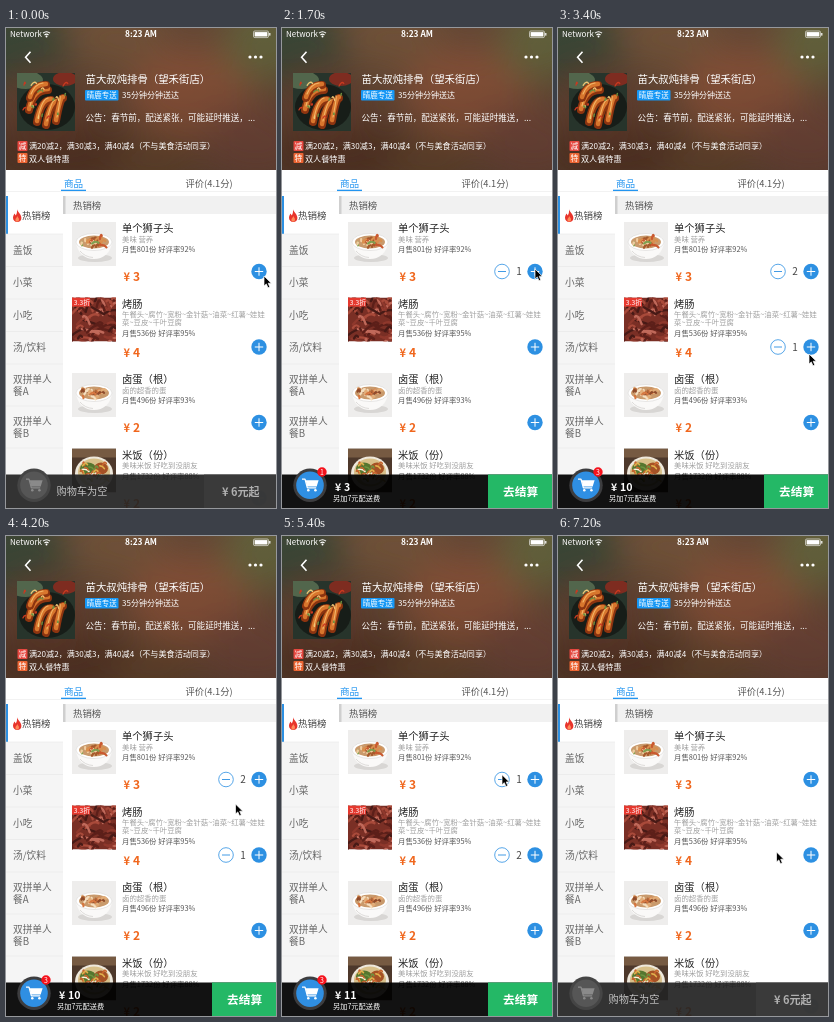
Recreate the animation shown at these times as an HTML page. Size 270 px wide and 480 px high, loop 7300 ms.

```html
<!DOCTYPE html>
<html lang="zh-CN">
<head>
<meta charset="utf-8">
<title>Menu and cart</title>
<style>
html, body { margin: 0; width: 100%; height: 100%; overflow: hidden; background: #fff; }
svg { display: block; width: 100vw; height: 100vh; }
text { font-family: "Noto Sans CJK SC", "Noto Sans CJK", "Noto Sans", sans-serif; white-space: pre; }
</style>
</head>
<body>
<svg id="stage" viewBox="0 0 270 480" xmlns="http://www.w3.org/2000/svg">
  <defs>
    <filter id="soft" x="-50%" y="-50%" width="200%" height="200%"><feGaussianBlur stdDeviation="17"/></filter>
    <linearGradient id="shade" x1="0" y1="0" x2="0" y2="1">
      <stop offset="0" stop-color="#000" stop-opacity=".05"/>
      <stop offset="1" stop-color="#000" stop-opacity=".2"/>
    </linearGradient>
    <clipPath id="top"><rect width="270" height="142"/></clipPath>
    <clipPath id="thumb"><rect width="44" height="44"/></clipPath>
    <clipPath id="cover"><rect x="11" y="45" width="58" height="58"/></clipPath>
  </defs>
  <g id="page"></g>
  <g id="controls"></g>
  <g id="bar"></g>
  <g id="balls"></g>
  <path id="cursor" d="M0 0V10L2.3 7.9L4 11.8L5.8 11L4.2 7.2H7.3Z" fill="#000" stroke="#fff" stroke-width=".7"/>
</svg>
<script>
const $ = id => document.getElementById(id);
const BLUE = '#2d90e2', ORANGE = '#f0661c';
const LOOP = 7300, TICK = 100, FLY = 500, SLIDE = 220;
const ROW = 75.5;

const text = (x, y, size, fill, s, extra = '') =>
  `<text x="${x}" y="${y}" font-size="${size}" fill="${fill}" ${extra}>${s}</text>`;
const rect = (x, y, w, h, fill, extra = '') =>
  `<rect x="${x}" y="${y}" width="${w}" height="${h}" fill="${fill}" ${extra}/>`;
const circle = (x, y, r, fill, extra = '') =>
  `<circle cx="${x}" cy="${y}" r="${r}" fill="${fill}" ${extra}/>`;
const oval = (x, y, rx, ry, fill, extra = '') =>
  `<ellipse cx="${x}" cy="${y}" rx="${rx}" ry="${ry}" fill="${fill}" ${extra}/>`;
const line = (d, color, w, extra = '') =>
  `<path d="${d}" fill="none" stroke="${color}" stroke-width="${w}" ${extra}/>`;
const BOLD = 'font-weight="700"', MEDIUM = 'font-weight="500"', MID = 'text-anchor="middle"';

function random(seed) {
  return () => (seed = (seed * 16807) % 2147483647) / 2147483647;
}

function strokes(seed, n, x, y, w, h, colors, len, width) {
  const rnd = random(seed);
  let s = '';
  for (let i = 0; i < n; i++) {
    const px = x + rnd() * w, py = y + rnd() * h;
    const dx = (rnd() - .3) * len, dy = (rnd() - .5) * len;
    const color = colors[Math.floor(rnd() * colors.length)];
    s += line(`M${px} ${py}q${dx} ${dy - 3} ${dx * 1.7} ${dy}`, color, width, 'stroke-linecap="round"');
  }
  return s;
}

function header() {
  const glow = [
    [10, 20, 60, 45, '#3e4a38'], [110, 10, 50, 35, '#74543a'], [185, 65, 65, 45, '#8d553b'],
    [262, 15, 45, 40, '#66653c'], [60, 125, 80, 30, '#5b3728'], [250, 115, 55, 40, '#75483a'],
    [150, 135, 45, 22, '#6c4a2e'], [40, 75, 45, 35, '#6a4330']
  ].map(g => oval(...g)).join('');
  const wings = [[23, 82, 42, 62], [31, 94, 45, 72], [40, 97, 52, 74], [50, 93, 57, 70], [24, 70, 40, 57]]
    .map(([a, b, c, d]) =>
      line(`M${a} ${b}Q${a + 4} ${d} ${c} ${d}`, '#8c3410', 8, 'stroke-linecap="round"') +
      line(`M${a} ${b - 1}Q${a + 4} ${d - 1} ${c} ${d - 1}`, '#d8762d', 4.5, 'stroke-linecap="round"') +
      line(`M${a + 1} ${b - 4}Q${a + 5} ${d - 1} ${c - 3} ${d - 2}`, '#f2b567', 1.2, 'stroke-linecap="round"')
    ).join('');
  return `<g clip-path="url(#top)">${rect(0, 0, 270, 142, '#674a37')}<g filter="url(#soft)">${glow}</g>
      ${rect(0, 0, 270, 142, 'url(#shade)')}</g>
    <g clip-path="url(#cover)">${rect(11, 45, 58, 58, '#27342b')}
      ${oval(20, 52, 17, 9, '#52664c')}${oval(59, 51, 12, 7, '#7e2c20')}
      ${oval(41, 79, 28, 23, '#171d18')}${wings}
      ${strokes(31, 16, 18, 54, 44, 40, ['#6b9140', '#c93a20', '#efc777'], 6, 1.3)}</g>`
    + text(4, 9.2, 8, '#fff', 'Network')
    + line('M37 5.2Q40.5 2.2 44 5.2M38.5 7Q40.5 5.3 42.5 7', '#fff', 1.1) + circle(40.5, 8.6, 1, '#fff')
    + text(135, 9.4, 8.4, '#fff', '8:23 AM', MID + ' ' + BOLD)
    + rect(247.5, 3, 15, 6.6, 'none', 'rx="1.3" stroke="#fff" stroke-width=".6"')
    + rect(248.6, 4.1, 12.8, 4.4, '#fff') + rect(263.2, 5, 1.2, 2.6, '#fff')
    + line('M24.5 23.7L19.6 29.2L24.5 34.7', '#fff', 1.6)
    + [244, 249.5, 255].map(x => circle(x, 29, 1.6, '#fff')).join('')
    + text(79.5, 55.2, 10.4, '#fff', '苗大叔炖排骨（望禾街店）')
    + rect(79, 62, 33.5, 10.5, '#1597f5', 'rx="1"')
    + text(80.8, 70, 7.5, '#fff', '晴鹿专送')
    + text(116, 70.3, 8, '#fff', '35分钟分钟送达')
    + text(79.5, 92.7, 8.55, '#fff', '公告：春节前，配送紧张，可能延时推送，...')
    + rect(11.5, 113, 10, 10, '#e5473f', 'rx="1"') + text(12.6, 121, 7.8, '#fff', '减')
    + text(23, 121.2, 8.1, '#fff', '满20减2，满30减3，满40减4（不与美食活动同享）')
    + rect(11.5, 125, 10, 10, '#ec6533', 'rx="1"') + text(12.6, 133, 7.8, '#fff', '特')
    + text(23, 134, 8.1, '#fff', '双人餐特惠');
}

function sidebar() {
  const rows = [[238.5, '盖饭'], [271, '小菜'], [303.5, '小吃'], [336, '汤/饮料'], [378, '双拼单人', '餐A'], [420, '双拼单人', '餐B']];
  let top = 206, s = rect(0, 168, 57, 280, '#f5f5f5') + rect(0, 168, 57, 38, '#fff') + rect(0, 168, 2, 38, BLUE);
  s += '<path d="M11 181.2C11.6 184 15.4 186 15.4 190C15.4 192.6 13.6 194 11.3 194C8.8 194 7 192.4 7 189.8C7 188 8 186.6 8.7 185.6L9.6 187.4C11 185.8 11.2 183.6 11 181.2Z" fill="#e8352c"/>';
  s += '<path d="M11.4 188C11.8 189.6 13 190 13 191.6C13 193 12.2 193.6 11.2 193.6S9.4 193 9.4 191.7C9.4 190.3 11 189.7 11.4 188Z" fill="#ff8a5a"/>';
  s += text(16, 191.2, 9.5, '#444', '热销榜');
  for (const [bottom, a, b] of rows) {
    const mid = (top + bottom) / 2;
    s += text(7, mid + (b ? -1.9 : 3.5), 9.7, '#666', a);
    if (b) s += text(7, mid + 10, 9.7, '#666', b);
    s += rect(0, top - .25, 57, .5, '#e2e2e2');
    top = bottom;
  }
  return s + rect(0, top - .25, 57, .5, '#e2e2e2');
}

function bowl(seed, colors) {
  return rect(0, 0, 44, 44, '#eeedec') + oval(23, 36, 17, 4, '#d8d6d4')
    + '<path d="M4 20C5 31 13 37 22 37S39 31 40 20Z" fill="#faf9f8"/>'
    + oval(22, 20, 18, 8.5, '#fff', 'stroke="#d9d7d5" stroke-width=".6"') + oval(22, 20, 15, 6.5, '#c99a6c')
    + strokes(seed, 26, 10, 16, 20, 8, colors, 6, 2.2)
    + line('M8 29Q13 35 21 35.5', '#dedcda', 1);
}

const pictures = [
  bowl(7, ['#a65a2c', '#d98f4e', '#f0cda0', '#7fa050', '#c9592f']),
  rect(0, 0, 44, 44, '#7a2f25')
    + strokes(19, 75, -4, 0, 48, 46, ['#a94a3a', '#5c1f19', '#c0695a', '#8f382c', '#471a16'], 15, 2.4)
    + rect(0, 0, 18, 9, '#e5392f') + text(1.8, 7.2, 6.8, '#fff', '3.3折'),
  bowl(23, ['#b5693a', '#e2ad78', '#f5dfc0', '#8f4b2b', '#d6763f']),
  rect(0, 0, 44, 44, '#4d382b') + rect(0, 0, 44, 9, '#765a42') + oval(22, 25, 19, 17, '#eee8dc')
    + oval(22, 24, 16, 14, '#d8c08a') + oval(16, 20, 8, 6, '#55762f') + oval(29, 20, 7, 6, '#a65225')
    + oval(23, 30, 10, 6, '#f4ead2')
    + strokes(41, 24, 10, 14, 22, 18, ['#6d9440', '#e0b04c', '#c9652e', '#fff5df'], 6, 1.6)
];

const dishes = [
  { name: '单个狮子头', notes: ['美味 营养'], sold: 801, rate: 92, price: 3 },
  { name: '烤肠', notes: ['午餐头~腐竹~宽粉~金针菇~油菜~红薯~娃娃', '菜~豆皮~千叶豆腐'], sold: 536, rate: 95, price: 4 },
  { name: '卤蛋（根）', notes: ['卤的超香的蛋'], sold: 496, rate: 93, price: 2 },
  { name: '米饭（份）', notes: ['美味米饭 好吃到没朋友'], sold: 1732, rate: 88, price: 2 }
];

function dish(d, i) {
  const y = ROW * i, extra = (d.notes.length - 1) * 8;
  return `<g transform="translate(66 ${194 + y})"><g clip-path="url(#thumb)">${pictures[i]}</g></g>`
    + text(116, 204 + y, 10.3, '#222', d.name, MEDIUM)
    + d.notes.map((n, k) => text(116, 213.7 + y + k * 7.8, 7.4, '#a0a0a0', n)).join('')
    + text(116, 224.2 + y + extra, 7.4, '#555', `月售${d.sold}份 好评率${d.rate}%`)
    + text(117.5, 253.2 + y, 11, ORANGE, '¥', BOLD) + text(127, 253.4 + y, 12, ORANGE, d.price, BOLD);
}

$('page').innerHTML = rect(0, 0, 270, 480, '#fff') + header()
  + text(58, 159, 9.6, '#2395f0', '商品', MEDIUM) + rect(55, 161.7, 25, 1.4, '#2395f0')
  + text(179.5, 158.8, 9.3, '#555', '评价(4.1分)')
  + rect(0, 163.2, 270, .5, '#e4e4e4')
  + sidebar() + rect(57, 168, 213, 18, '#f1f1f1') + rect(57, 168, 2.5, 18, '#cfcfcf')
  + text(67, 180.7, 9.4, '#555', '热销榜')
  + dishes.map(dish).join('');

// time, dish, change
const taps = [
  [400, 0, 1], [1982, 0, 1], [2850, 1, 1], [4700, 1, 1],
  [5250, 0, -1], [5750, 0, -1], [6500, 1, -1], [6950, 1, -1]
];

// time, x, y
const route = [
  [0, 258, 248], [350, 253, 242], [900, 253, 241], [1990, 253, 241], [2400, 250, 366], [2750, 251, 318],
  [3400, 251, 326], [3800, 251, 326], [4200, 229.5, 268], [4600, 253, 316], [4850, 253, 316],
  [5200, 220, 239], [5800, 220, 238], [6350, 219, 316], [LOOP, 218.5, 316]
];

const clamp = v => Math.max(0, Math.min(1, v));
const smooth = p => p * p * (3 - 2 * p);

function pointer(t) {
  const i = route.findIndex(r => r[0] > t);
  const [t0, x0, y0] = route[i - 1], [t1, x1, y1] = route[i];
  const p = smooth((t - t0) / (t1 - t0));
  return [x0 + (x1 - x0) * p, y0 + (y1 - y0) * p];
}

function stepper(i, count, open) {
  const y = 243.5 + ROW * i, x = 253 - 33 * open;
  const minus = open ? `<g opacity="${open}">`
    + circle(x, y, 7.3, '#fff', `stroke="${BLUE}" stroke-width=".8"`)
    + line(`M${x - 4} ${y}h8`, BLUE, .9)
    + text(253 - 16 * open, y + 3.7, 10, '#444', count || 1, MID) + '</g>' : '';
  return minus + circle(253, y, 7.7, BLUE) + line(`M248.8 ${y}h8.4M253 ${y - 4.2}v8.4`, '#fff', 1);
}

function cart(total, price) {
  const on = total > 0, ink = on ? '#fff' : '#8a8a8a';
  return rect(0, 446.5, 270, 33.5, on ? '#000' : '#242424', 'opacity=".93"')
    + (on ? rect(206, 446.5, 64, 33.5, '#24b866') : rect(198, 446.5, 72, 33.5, '#3b3b3b', 'opacity=".85"'))
    + circle(28, 457.3, 16.7, on ? '#3d3d3f' : '#454545') + circle(28, 457.3, 13.8, on ? '#2f8fe3' : '#565656')
    + line('M20 451.2h3l2.4 8.6h8.8', ink, 1.3, 'stroke-linejoin="round"')
    + `<path d="M23.6 452.3H36.6L34.7 458.5H25.3Z" fill="${ink}"/>`
    + circle(26.3, 462.2, 1.3, ink) + circle(33.4, 462.2, 1.3, ink)
    + (on
      ? circle(40, 444, 4.7, '#f5121c') + text(40, 446.6, 7, '#fff', total, MID)
        + text(53, 463, 10.4, '#fff', '¥', BOLD) + text(62, 463, 10.6, '#fff', price, BOLD)
        + text(51, 473.2, 7.2, '#fff', '另加7元配送费')
        + text(221, 468, 11.7, '#fff', '去结算', BOLD)
      : text(50.5, 467.3, 10.2, '#c4c4c4', '购物车为空')
        + text(216, 468, 11, '#b0b0b0', '¥ 6元起', BOLD));
}

function draw(t) {
  const count = dishes.map(() => 0), open = dishes.map(() => 0);
  let balls = '';
  for (const [at, i, change] of taps) {
    if (t < at) break;
    const before = count[i];
    count[i] += change;
    const p = clamp((t - at) / SLIDE);
    if (!before) open[i] = p;
    else if (!count[i]) open[i] = 1 - p;
    const f = (t - at) / FLY;
    if (change > 0 && f < 1) {
      const y = 243.5 + ROW * i, q = .46 * f * f + .54 * f;
      balls += circle(253 - 225 * f, y + (455 - y) * q, 5, BLUE);
    }
  }
  const total = count.reduce((a, b) => a + b);
  const price = count.reduce((sum, n, i) => sum + n * dishes[i].price, 0);
  $('controls').innerHTML = count.map((n, i) => stepper(i, n, open[i])).join('');
  $('bar').innerHTML = cart(total, price);
  $('balls').innerHTML = balls;
  $('cursor').setAttribute('transform', `translate(${pointer(t)})`);
}

const start = performance.now();
let last = -1;
function frame(now) {
  const t = Math.floor(Math.max(0, now - start) % LOOP / TICK) * TICK;
  if (t !== last) draw(last = t);
  requestAnimationFrame(frame);
}
draw(0);
requestAnimationFrame(frame);
</script>
</body>
</html>
```
